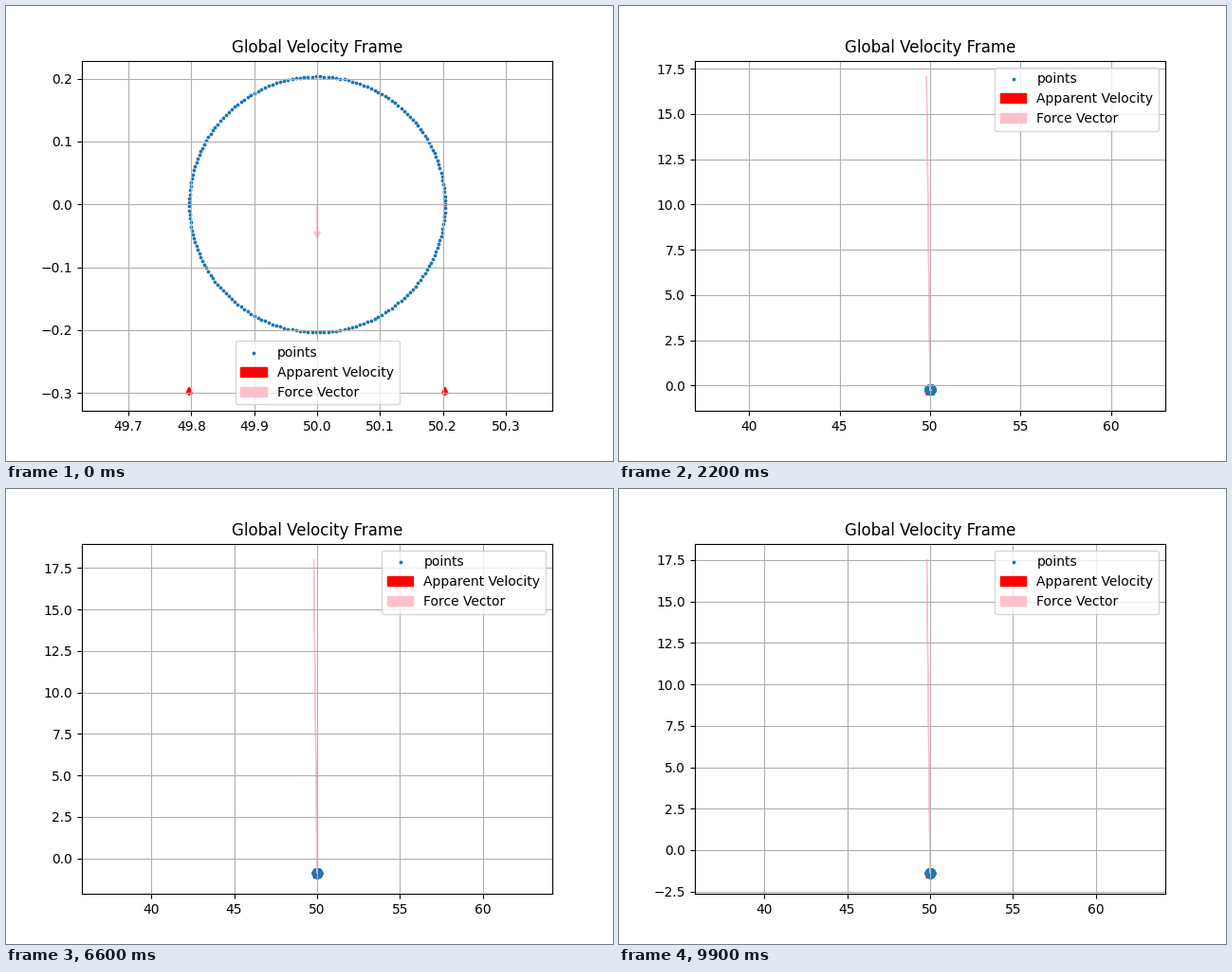
A matplotlib script for the animation above (10 s loop, 640 by 480 pixels).

```python
import numpy as np
import matplotlib.pyplot as plt
from matplotlib.animation import FuncAnimation

FRAMES = 100
RADIUS = 0.2032
X0 = 50.0
G, DT, V_MAX = 9.8, 0.01, 1.5
WEIGHT, LIFT, SIDE = 0.044, 18.934, -0.2
V_SCALE = 0.025

angles = np.linspace(0, 2 * np.pi, 200)
rim_x = X0 + RADIUS * np.cos(angles)
rim_y = RADIUS * np.sin(angles)

# Free fall up to the speed limit, integrated in fixed steps.
speed = np.minimum(G * DT * np.arange(FRAMES + 1), V_MAX)
depth = np.cumsum(speed * DT)

fig, ax = plt.subplots(figsize=(6.4, 4.8), dpi=100)


def resistance(d):
    """Share of the full ground force at depth d: quadratic, then saturating."""
    u = (d / RADIUS) ** 2
    return min(1.002 * u / (1 + u ** 4.2) ** (1 / 4.2), 1.0)


def arrow(x, y, dx, dy, color, label=None):
    ax.arrow(x, y, dx, dy, width=0.001, head_width=0.01, head_length=0.01,
             color=color, label=label)


def draw(i):
    ax.clear()
    cy = -depth[i]
    share = resistance(depth[i])
    foot = cy - RADIUS - 0.1
    v = V_SCALE * speed[i + 1]

    arrow(X0 + RADIUS, foot, 0, v, "red")
    ax.scatter(rim_x, rim_y + cy, s=3, label="points")
    arrow(X0 - RADIUS, foot, 0, v, "red", "Apparent Velocity")
    arrow(X0, cy, SIDE * share ** 0.37, LIFT * share - WEIGHT,
          "pink", "Force Vector")

    ax.axis("equal")
    ax.grid(True)
    ax.set_title("Global Velocity Frame")
    ax.legend(loc="best")


anim = FuncAnimation(fig, draw, frames=FRAMES, interval=100,
                     init_func=lambda: None, repeat=True, repeat_delay=0)
plt.show()
```
